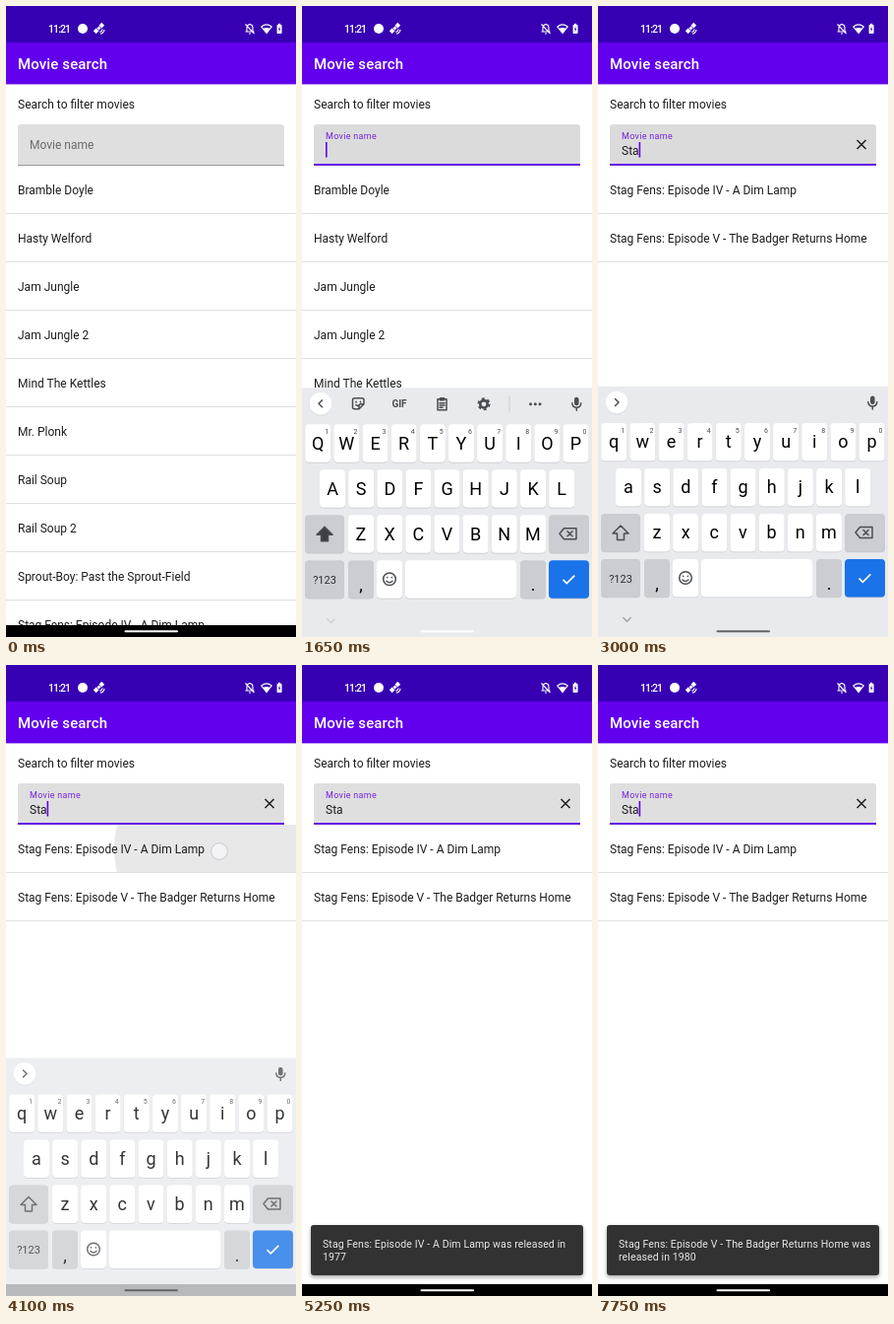
Write an HTML page that moves like this. It is 295 px wide and 640 px high and loops after 8 s.

```html
<!DOCTYPE html>
<html lang="en">
<head>
<meta charset="utf-8">
<title>Movie search</title>
<style>
html, body { margin: 0; width: 100%; height: 100%; overflow: hidden; background: #fff; }
svg { display: block; width: 100%; height: 100%; font-family: Roboto, Arial, sans-serif; }
.item { font-size: 12px; fill: #1c1c1c; }
.key { font-size: 18px; fill: #000; text-anchor: middle; }
.hint { font-size: 7px; fill: #44474b; text-anchor: middle; }
.line { fill: none; stroke: #4a4d52; stroke-width: 1.5; stroke-linecap: round; stroke-linejoin: round; }
.snack { font-size: 10.5px; letter-spacing: .12px; fill: #e9e9e9; }
</style>
</head>
<body>
<svg id="stage" viewBox="0 0 295 640" preserveAspectRatio="none"></svg>
<script>
const LOOP = 8000;
const ROW_TOP = 162, ROW_H = 49;
const SEQUEL_4 = 'Stag Fens: Episode IV - A Dim Lamp';
const SEQUEL_5 = 'Stag Fens: Episode V - The Badger Returns Home';
const MOVIES = [
  'Bramble Doyle', 'Hasty Welford', 'Jam Jungle', 'Jam Jungle 2', 'Mind The Kettles',
  'Mr. Plonk', 'Rail Soup', 'Rail Soup 2', 'Sprout-Boy: Past the Sprout-Field',
  SEQUEL_4, SEQUEL_5
];
const TYPED = [[2400, 'S'], [2580, 'St'], [2750, 'Sta']];
// x, y, down, up
const TOUCHES = [
  [150, 141, 1250, 1390], [64, 492, 2150, 2340], [133, 445, 2430, 2530],
  [32, 491, 2620, 2710], [217, 189, 4000, 4130], [235, 246, 6500, 6670]
];
// letter, key centre x, key top, down, up
const POPUPS = [['S', 60, 469, 2150, 2350], ['t', 132.5, 423, 2430, 2530], ['a', 31, 469, 2620, 2710]];
// row, touch x, start
const RIPPLES = [[0, 217, 4055], [1, 235, 6590]];

const clamp = v => Math.max(0, Math.min(1, v));
const lerp = (a, b, p) => a + (b - a) * p;
const prog = (t, start, dur) => clamp((t - start) / dur);

function bezier(x1, y1, x2, y2) {
  const at = (a, b, s) => 3 * a * s * (1 - s) ** 2 + 3 * b * s * s * (1 - s) + s ** 3;
  return x => {
    let lo = 0, hi = 1;
    for (let i = 0; i < 24; i++) {
      const mid = (lo + hi) / 2;
      if (at(x1, x2, mid) < x) lo = mid; else hi = mid;
    }
    return at(y1, y2, (lo + hi) / 2);
  };
}
const standard = bezier(.4, 0, .2, 1);
const enter = bezier(0, 0, .2, 1);
const leave = bezier(.4, 0, 1, 1);

const rect = (x, y, w, h, fill, r = 0, more = '') =>
  `<rect x="${x}" y="${y}" width="${w}" height="${h}" rx="${r}" fill="${fill}" ${more}/>`;
const text = (x, y, str, attrs = '') => `<text x="${x}" y="${y}" ${attrs}>${str}</text>`;
const line = (d, more = '') => `<path class="line" d="${d}" ${more}/>`;

function statusBar() {
  const satellite = rect(-6, -2, 4, 4, '#fff') + rect(-1.5, -1.5, 3, 3, '#fff') + rect(2, -2, 4, 4, '#fff') +
    '<path d="M-2 3.200q2 1.600 4 0M-3 5q3 2.200 6 0" fill="none" stroke="#fff"/>';
  return rect(0, 0, 295, 79.4, '#6200ee') + rect(0, 0, 295, 37, '#3700b3') +
    text(43, 26.8, '11:21', 'font-size="10.5" font-weight="500" letter-spacing="-.9" fill="#fff"') +
    `<circle cx="78" cy="23" r="5" fill="#fff"/>
    <g transform="translate(94.500 22.500) rotate(-45)">${satellite}</g>
    <g fill="none" stroke="#fff" stroke-width="1.1">
      <path d="M245 26v-4q0-3 3-3.5q3 .5 3 3.5v4M243.5 26h9M247 28h2M243.5 18.5l9 9.5"/>
      <path d="M265 27.5L259.8 21Q265 16.8 270.2 21Z"/>
    </g>
    <path d="M265 28l-3.8-5q3.8-2.2 7.6 0z" fill="#fff"/>` +
    rect(275.6, 19, 5, 9, '#fff', .8) + rect(277, 17.8, 2.2, 1.5, '#fff') +
    '<path d="M278.6 20.8l-1.7 3h1l-.3 2.4 1.7-3h-1z" fill="#3700b3"/>' +
    text(12, 64.3, 'Movie search', 'font-size="15" font-weight="500" letter-spacing=".11" fill="#fff"');
}

function field() {
  return text(12, 104.3, 'Search to filter movies', 'class="item"') +
    '<path id="box" d="M12 161.6V123q0-3 3-3H280q3 0 3 3V161.6z"/>' +
    rect(12, 161, 271, .8, '#858585') +
    '<rect id="underline" y="160" height="1.8" fill="#6200ee"/>' +
    text(24, 0, 'Movie name', 'id="label"') +
    text(24, 150.5, '', 'id="input" class="item"') +
    rect(0, 138, 1.6, 15.5, '#6200ee', 0, 'id="cursor"') +
    '<path id="clear" d="M263.5 136l9 9m0-9l-9 9" stroke="#222" stroke-width="1.6"/>';
}

function rows() {
  return RIPPLES.map(([row], i) =>
    `<clipPath id="clip${i}">${rect(0, ROW_TOP + row * ROW_H, 295, ROW_H - 1, '#000')}</clipPath>
     <g clip-path="url(#clip${i})"><circle class="ripple"/></g>`).join('') +
    MOVIES.map(name => `<g class="row">${text(12, 28.7, name, 'class="item"')}${rect(0, 48, 295, 1, '#e0e0e0')}</g>`).join('');
}

function keyboard() {
  const PLAIN = '#fff', SPECIAL = '#cbcdd2', BOTTOM = 561;
  const cap = (x, y, w, fill) => rect(x, y + .8, w, 38.5, '#c6c8cc', 4) + rect(x, y, w, 38.5, fill, 4);
  const letters = (chars, x0, top) => [...chars].map((c, i) => {
    const x = x0 + i * 29.15;
    return cap(x - 13, top, 26, PLAIN) + text(x, top + 25.3, c, 'class="key letter"') +
      (top < 430 ? text(x + 9, top + 9.5, (i + 1) % 10, 'class="hint"') : '');
  }).join('');
  const tools =
    line('M53.5 396.5h7.5q2 0 2 2v4l-5 5h-4.5q-2 0-2-2v-7q0-2 2-2zM63 402.5h-3q-2 0-2 2v3M55 400v.6M59.5 400v.6M54.8 403.2q1.2 1.2 2.6.8') +
    text(99, 406, 'GIF', 'font-size="10" font-weight="700" fill="#4a4d52" text-anchor="middle"') +
    line('M138 397.5h9v11h-9zM140.5 396.5h4v2h-4zM140 401.5h5M140 403.8h5M140 406h3') +
    '<circle cx="185" cy="402.5" r="3.7" fill="none" stroke="#4a4d52" stroke-width="2.6"/>' +
    '<circle cx="185" cy="402.5" r="5.5" fill="none" stroke="#4a4d52" stroke-width="2" stroke-dasharray="2.88 2.88"/>' +
    rect(210.5, 394, 1, 17, '#cdd0d4') +
    [232.5, 237.3, 242].map(x => `<circle cx="${x}" cy="402.5" r="1.5" fill="#4a4d52"/>`).join('');
  return rect(0, 386, 295, 330, '#e9eaee') +
    '<circle cx="19" cy="402.8" r="11.5" fill="#d9dbdf"/><circle cx="19" cy="402" r="11.3" fill="#fff"/>' +
    line('M20.5 398.5l-3.5 3.5 3.5 3.5', 'id="arrow"') +
    `<g id="tools">${tools}</g>` +
    rect(277, 395.5, 4.6, 8.5, '#4a4d52', 2.3) + line('M274.8 401.5q.3 4.5 4.5 4.5t4.5-4.5M279.3 406v3') +
    letters('qwertyuiop', 16.2, 423) + letters('asdfghjkl', 31, 469) +
    cap(3, 515, 40, SPECIAL) + letters('zxcvbnm', 60, 515) + cap(251, 515, 41, SPECIAL) +
    '<path id="shift" class="line" d="M23 527l8 8h-4.5v6.5h-7v-6.5h-4.5z"/>' +
    line('M266.5 528.5h12.5v11h-12.5l-4.5-5.5zM270 531.5l5 5m0-5l-5 5') +
    cap(3, BOTTOM, 40, SPECIAL) + text(23, 584.5, '?123', 'font-size="11" fill="#2b2e31" text-anchor="middle"') +
    cap(47, BOTTOM, 26, SPECIAL) + text(60, 592, ',', 'class="key"') +
    cap(76, BOTTOM, 26, PLAIN) +
    '<circle class="line" cx="89" cy="580" r="6.3"/>' + line('M86.7 578.2v.3M91.3 578.2v.3M86 582q3 3 6 0') +
    cap(105, BOTTOM, 113, PLAIN) +
    cap(222, BOTTOM, 26, SPECIAL) + text(235, 592, '.', 'class="key"') +
    cap(251, BOTTOM, 41, '#1a73e8') +
    '<path d="M265.5 580.5l3.8 3.8 8-8" fill="none" stroke="#fff" stroke-width="1.7"/>' +
    line('M25.8 620.5l3.7 3.7 3.7-3.7', 'id="down" style="stroke:#a2a5aa"') +
    POPUPS.map(([c, x, top]) => `<g class="popup">` +
      rect(x - 14.5, top - 53, 29, 93, '#c7c9cc', 4, 'filter="url(#soft)"') +
      text(x, top - 24, c, 'class="key" style="font-size:22px"') +
      (c === 'S' ? text(x + 7, top - 15.5, '...', 'font-size="9" text-anchor="middle"') : '') + '</g>').join('');
}

function snackbar(first, second) {
  return `<g class="bar">${rect(9, 568, 277, 51, '#323232', 3, 'filter="url(#drop)"')}` +
    text(21, 591, first, 'class="snack"') + text(21, 603.7, second, 'class="snack"') + '</g>';
}

const stage = document.getElementById('stage');
stage.innerHTML = `<defs>
  <filter id="drop" x="-10%" y="-30%" width="120%" height="170%"><feDropShadow dx="0" dy="2" stdDeviation="2" flood-opacity=".35"/></filter>
  <filter id="soft" x="-30%" y="-10%" width="160%" height="125%"><feDropShadow dx="0" dy="1" stdDeviation="1.5" flood-opacity=".3"/></filter>
  </defs>` +
  rect(0, 0, 295, 640, '#fff') + rows() + statusBar() + field() +
  snackbar(SEQUEL_4 + ' was released in', '1977') +
  snackbar(SEQUEL_5 + ' was', 'released in 1980') +
  rect(0, 628, 295, 12, '#000') + `<g id="keyboard">${keyboard()}</g>` +
  rect(120.5, 633.3, 54.5, 2, '#fff', 1, 'id="pill"') +
  TOUCHES.map(([x, y]) => `<circle class="dot" cx="${x}" cy="${y}" r="8.3" fill="#f5f5f8" fill-opacity=".9" stroke="#8c8ca0" stroke-opacity=".4" stroke-width=".9"/>`).join('');

const all = cls => [...stage.querySelectorAll('.' + cls)];
const ui = {};
for (const id of ['box', 'underline', 'label', 'input', 'cursor', 'clear', 'keyboard', 'arrow', 'tools', 'shift', 'down', 'pill'])
  ui[id] = document.getElementById(id);
const rowEls = all('row'), rippleEls = all('ripple'), letterEls = all('letter');
const popupEls = all('popup'), barEls = all('bar'), dotEls = all('dot');
const set = (el, attrs) => { for (const k in attrs) el.setAttribute(k, attrs[k]); };

function drawField(t) {
  const focus = standard(prog(t, 1400, 167));
  set(ui.label, {
    y: lerp(144.6, 134.5, focus), 'font-size': lerp(12, 9, focus),
    'letter-spacing': lerp(0, .3, focus), fill: t < 1400 ? '#6a6a6a' : '#7426dc'
  });
  set(ui.box, { fill: t > 1300 && t < 4100 ? '#dbdbdb' : '#dfdfdf' });
  set(ui.underline, { x: 147.5 - 135.5 * focus, width: 271 * focus });

  const typed = TYPED.filter(([at]) => t >= at).pop();
  ui.input.textContent = typed ? typed[1] : '';
  const since = typed ? typed[0] : 1400;
  const lit = t >= since && Math.floor((t - since) / 500) % 2 === 0;
  const width = typed ? ui.input.getComputedTextLength() : 0;
  set(ui.cursor, { x: 24 + width, opacity: lit ? 1 : 0 });
  set(ui.clear, { opacity: prog(t, 2400, 100) });
}

function drawRows(t) {
  const up = standard(prog(t, 2540, 160)), close = standard(prog(t, 2700, 180));
  rowEls.forEach((el, i) => {
    const matches = i >= 8;
    const y = matches ? lerp(i, i - 8, up) - (i > 8 ? close : 0) : i;
    const fade = i > 8 ? 0 : matches ? prog(t, 2600, 100) : prog(t, 2420, 120);
    set(el, { transform: `translate(0 ${ROW_TOP + y * ROW_H})`, opacity: 1 - fade });
  });
  RIPPLES.forEach(([row, x, start], i) => {
    const p = standard(prog(t, start, 225));
    set(rippleEls[i], {
      cx: lerp(x, 147.5, p), cy: ROW_TOP + row * ROW_H + 24.5, r: lerp(88.5, 150, p),
      opacity: .145 * prog(t, start, 75) * (1 - prog(t, start + 225, 150))
    });
  });
}

function drawKeyboard(t) {
  const opening = t < 3000;
  const shown = opening ? enter(prog(t, 1490, 200)) : 1 - leave(prog(t, 4024, 200));
  set(ui.keyboard, {
    transform: `translate(0 ${60 * (1 - shown)})`,
    opacity: opening ? prog(t, 1490, 130) : shown
  });
  const upper = t < 2330;
  for (const el of letterEls) {
    const c = el.textContent;
    el.textContent = upper ? c.toUpperCase() : c.toLowerCase();
  }
  ui.shift.style.fill = upper ? '#3c4043' : 'none';
  const fold = prog(t, 2420, 120);
  set(ui.tools, { opacity: 1 - fold });
  set(ui.arrow, { transform: `rotate(${180 * fold} 19 402)` });
  set(ui.down, { opacity: t < 4024 ? prog(t, 1600, 150) : 0 });
  POPUPS.forEach(([, , , down, lift], i) =>
    set(popupEls[i], { opacity: t < down ? 0 : 1 - prog(t, lift, 80) }));
  set(ui.pill, { fill: t > 1750 && t < 4180 ? '#63656a' : '#fff' });
}

function drawBars(t) {
  [[4180, 6700], [6790, LOOP]].forEach(([start, end], i) => {
    const scale = lerp(.8, 1, enter(prog(t, start, 150)));
    set(barEls[i], {
      opacity: prog(t, start, 150) * (1 - prog(t, end, 75)),
      transform: `translate(147.5 593.5) scale(${scale}) translate(-147.5 -593.5)`
    });
  });
}

function draw(t) {
  drawField(t);
  drawRows(t);
  drawKeyboard(t);
  drawBars(t);
  TOUCHES.forEach(([, , down, lift], i) =>
    set(dotEls[i], { opacity: t > down ? 1 - prog(t, lift, 100) : 0 }));
}

function tick() {
  draw(performance.now() % LOOP);
  requestAnimationFrame(tick);
}
tick();
</script>
</body>
</html>
```
